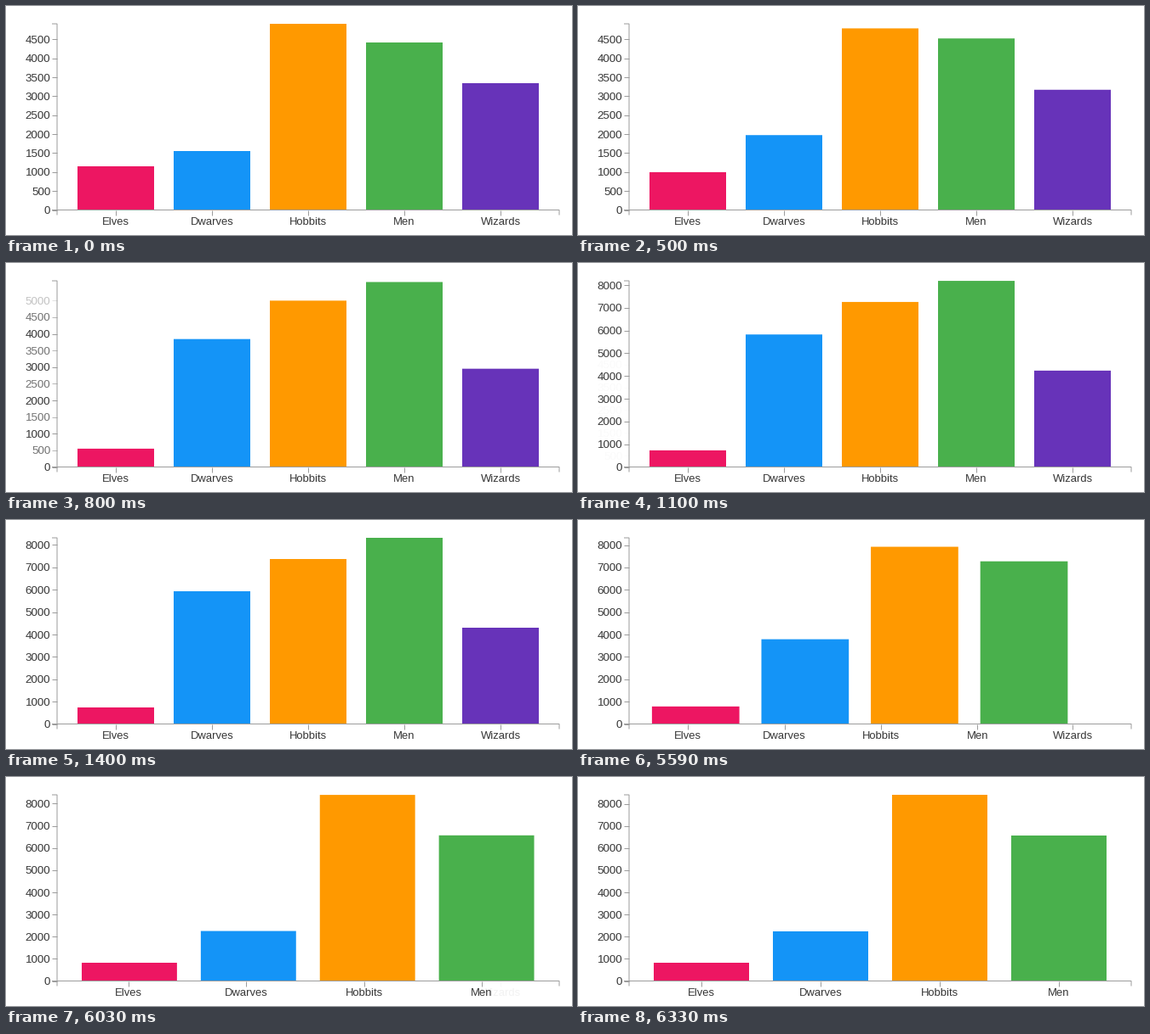
Recreate the animation shown at these times as a matplotlib script. Size 665 by 270 pixels, loop 8000 ms.

```python
import math
import matplotlib.pyplot as plt
from matplotlib.animation import FuncAnimation
from matplotlib.collections import LineCollection
from matplotlib.colors import to_rgb
from matplotlib.patches import Rectangle

W, H, DPI = 665, 270, 100
PX = 72 / DPI
STEP_MS, LOOP_MS = 20, 8000

LEFT, RIGHT, TOP, BASE = 60, 650, 21, 240.5
FULL = BASE - TOP
INK, LINE = "#363636", "#9c9c9c"

NAMES = ["Elves", "Dwarves", "Hobbits", "Men", "Wizards"]
COLORS = ["#ed1662", "#1494f7", "#ff9900", "#49b04c", "#6733b9"]

# Each layout: bar heights in pixels, axis maximum, tick step,
# first bar's left edge, distance between bars, bar width
LAYOUTS = [
    ([51.5, 69.5, 219.5, 197.5, 149.5], 4914, 500, 84, 113, 90),
    ([19.5, 156.5, 194.5, 219.5, 113.5], 8322, 1000, 84, 113, 90),
    ([21.5, 58.5, 219.5, 171.5], 8402, 1000, 89, 140, 112),
]

# The picture is refreshed only at these times
REFRESH = [0, 500, 650, 800, 950, 1100, 1250, 1400,
           5590, 5740, 5890, 6030, 6180, 6330]


def lerp(a, b, p):
    return a + (b - a) * p


def spring(u):
    """Critically damped spring going from 0 to 1."""
    return 1 - (1 + u) * math.exp(-u)


def cubic(t):
    t = min(max(t, 0), 1)
    return 4 * t ** 3 if t < 0.5 else 1 - 4 * (1 - t) ** 3


def phase(ms):
    """Layouts before and after, bar progress, axis progress."""
    t = max(r for r in REFRESH if r <= ms)
    if t < 500:
        return LAYOUTS[0], LAYOUTS[0], 0, 0
    if t < 5590:
        bar = spring(0.868 + 0.01184 * (t - 500))
        return LAYOUTS[0], LAYOUTS[1], bar, cubic((t - 485) / 750)
    bar = spring(1.94 + 0.01287 * (t - 5590))
    return LAYOUTS[1], LAYOUTS[2], bar, cubic(0.155 + (t - 5590) / 740)


def fade(before, after, p):
    return lerp(float(before), float(after), p)


def has_tick(layout, value):
    return value <= layout[1] and value % layout[2] == 0


fig = plt.figure(figsize=(W / 100, H / 100), dpi=DPI, facecolor="white")
ax = fig.add_axes([0, 0, 1, 1])
ax.set_xlim(0, W)
ax.set_ylim(H, 0)
ax.axis("off")

bars = [ax.add_patch(Rectangle((0, 0), 0, 0, fc=c, lw=0, snap=False))
        for c in COLORS]

for xs, ys in [
    ([LEFT - 6, LEFT, LEFT, LEFT - 6], [TOP, TOP, BASE, BASE]),
    ([LEFT, LEFT, RIGHT, RIGHT], [BASE + 6, BASE, BASE, BASE + 6]),
]:
    ax.plot(xs, ys, color=LINE, lw=PX, snap=False, zorder=3,
            solid_joinstyle="miter", solid_capstyle="butt")

ticks = ax.add_collection(
    LineCollection([], linewidths=PX, zorder=3), autolim=False)


def label(text, x, size, align):
    return ax.text(x, 258, text, size=size * PX, color=INK, ha=align,
                   va="baseline", family="Liberation Sans")


values = range(0, 8001, 500)
y_labels = [label(str(v), 52.3, 13.4, "right") for v in values]
x_labels = [label(n, 0, 13, "center") for n in NAMES]


def draw(i):
    old, new, bar_p, axis_p = phase(i * STEP_MS + STEP_MS / 2)
    segments, colors = [], []

    def add_tick(start, end, alpha):
        segments.append([start, end])
        colors.append((*to_rgb(LINE), alpha))

    for k, bar in enumerate(bars):
        stays = k < len(new[0])
        bar.set_visible(stays)
        if stays:
            height = lerp(old[0][k], new[0][k], bar_p)
            left = lerp(old[3] + k * old[4], new[3] + k * new[4], bar_p)
            bar.set_bounds(left, BASE - height,
                           lerp(old[5], new[5], bar_p), height)

        x_old = old[3] + k * old[4] + old[5] / 2
        x_new = new[3] + k * new[4] + new[5] / 2 if stays else x_old
        x = lerp(x_old, x_new, axis_p)
        alpha = fade(True, stays, axis_p)
        x_labels[k].set_x(x)
        x_labels[k].set_alpha(alpha)
        add_tick((x, BASE), (x, BASE + 6), alpha)

    unit = lerp(FULL / old[1], FULL / new[1], axis_p)
    for v, text in zip(values, y_labels):
        y = BASE - v * unit
        alpha = fade(has_tick(old, v), has_tick(new, v), axis_p)
        shown = alpha > 0 and y > 24
        text.set_visible(shown)
        if shown:
            text.set_y(y + 4.6)
            text.set_alpha(alpha)
            add_tick((LEFT - 6, y), (LEFT, y), alpha)

    ticks.set_segments(segments)
    ticks.set_color(colors)
    return [*bars, ticks, *x_labels, *y_labels]


anim = FuncAnimation(fig, draw, frames=LOOP_MS // STEP_MS, interval=STEP_MS,
                     init_func=lambda: draw(0), repeat=True, repeat_delay=0)
plt.show()
```
